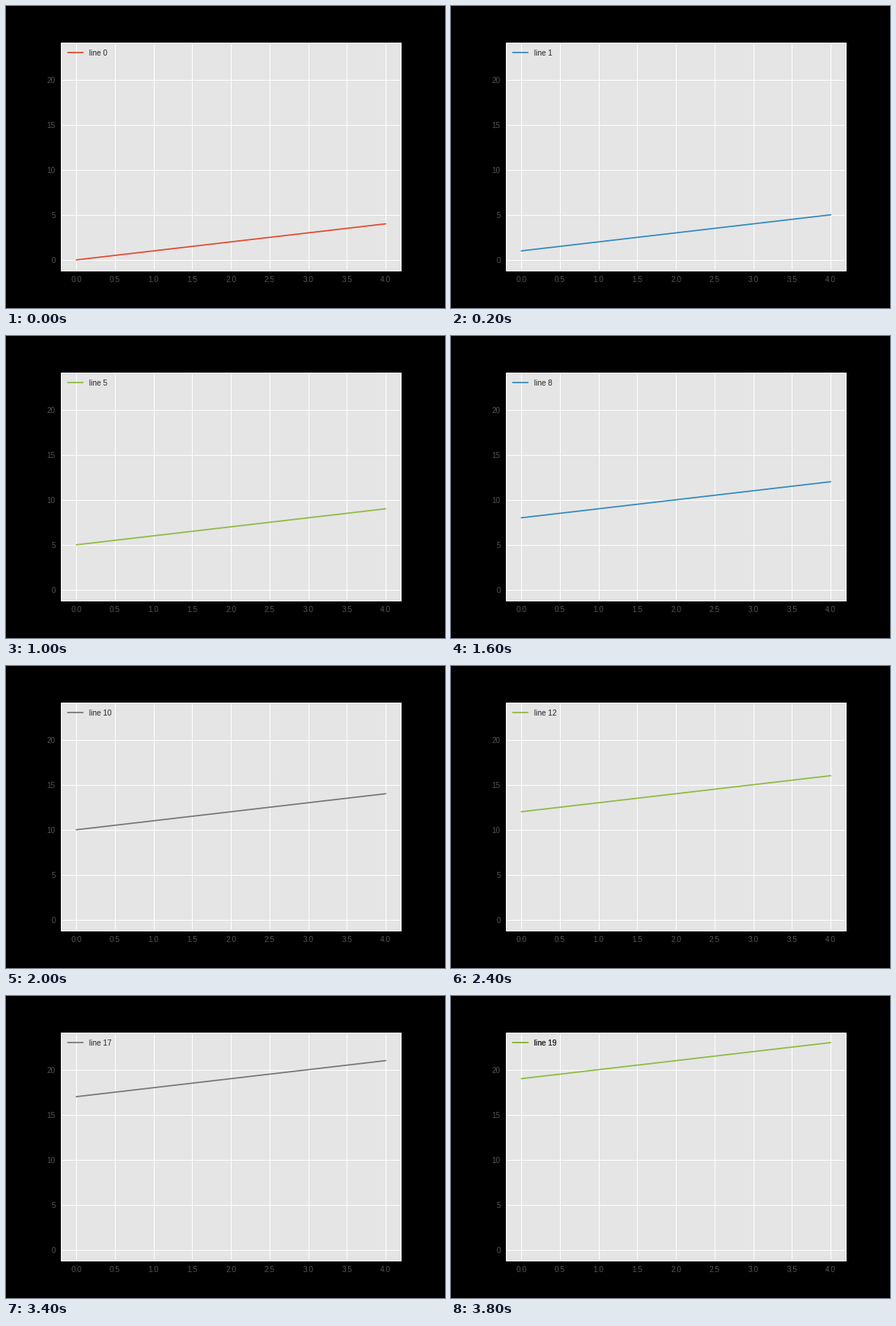
A matplotlib script that plays this animation: 576x396 px, repeating every 4000 ms.

```python
import matplotlib.pyplot as plt
import numpy as np
from matplotlib.animation import ArtistAnimation

COLORS = ["#E24A33", "#348ABD", "#988ED5", "#777777",
          "#FBC15E", "#8EBA42", "#FFB5B8"]
LINES = 20

plt.rcParams.update({
    "font.family": "Liberation Sans",
    "font.size": 10,
    "text.color": "0.15",
    "figure.facecolor": "black",
    "axes.facecolor": "#E5E5E5",
    "axes.edgecolor": "white",
    "axes.linewidth": 1,
    "axes.grid": True,
    "axes.axisbelow": True,
    "grid.color": "white",
    "grid.linewidth": 1,
    "lines.linewidth": 1.75,
    "lines.solid_capstyle": "round",
    "legend.frameon": False,
    "legend.fontsize": 10,
})
for axis in ("xtick", "ytick"):
    plt.rcParams.update({
        f"{axis}.color": "#555555",
        f"{axis}.labelsize": 10,
        f"{axis}.major.size": 0,
        f"{axis}.major.pad": 7,
    })

fig, ax = plt.subplots(figsize=(8, 5.5), dpi=72)
fig.subplots_adjust(left=0.125, right=0.9, bottom=0.125, top=0.88)

x = np.arange(5)
frames = []
for i in range(LINES):
    line, = ax.plot(x, x + i, color=COLORS[i % len(COLORS)])
    # The newest legend also stays on the axes, so the last one is drawn twice.
    legend = ax.legend([line], [f"line {i}"], loc="upper left")
    ax.add_artist(legend)
    frames.append([line, legend])

anim = ArtistAnimation(fig, frames, interval=200, repeat=True, repeat_delay=0)
plt.show()
```
